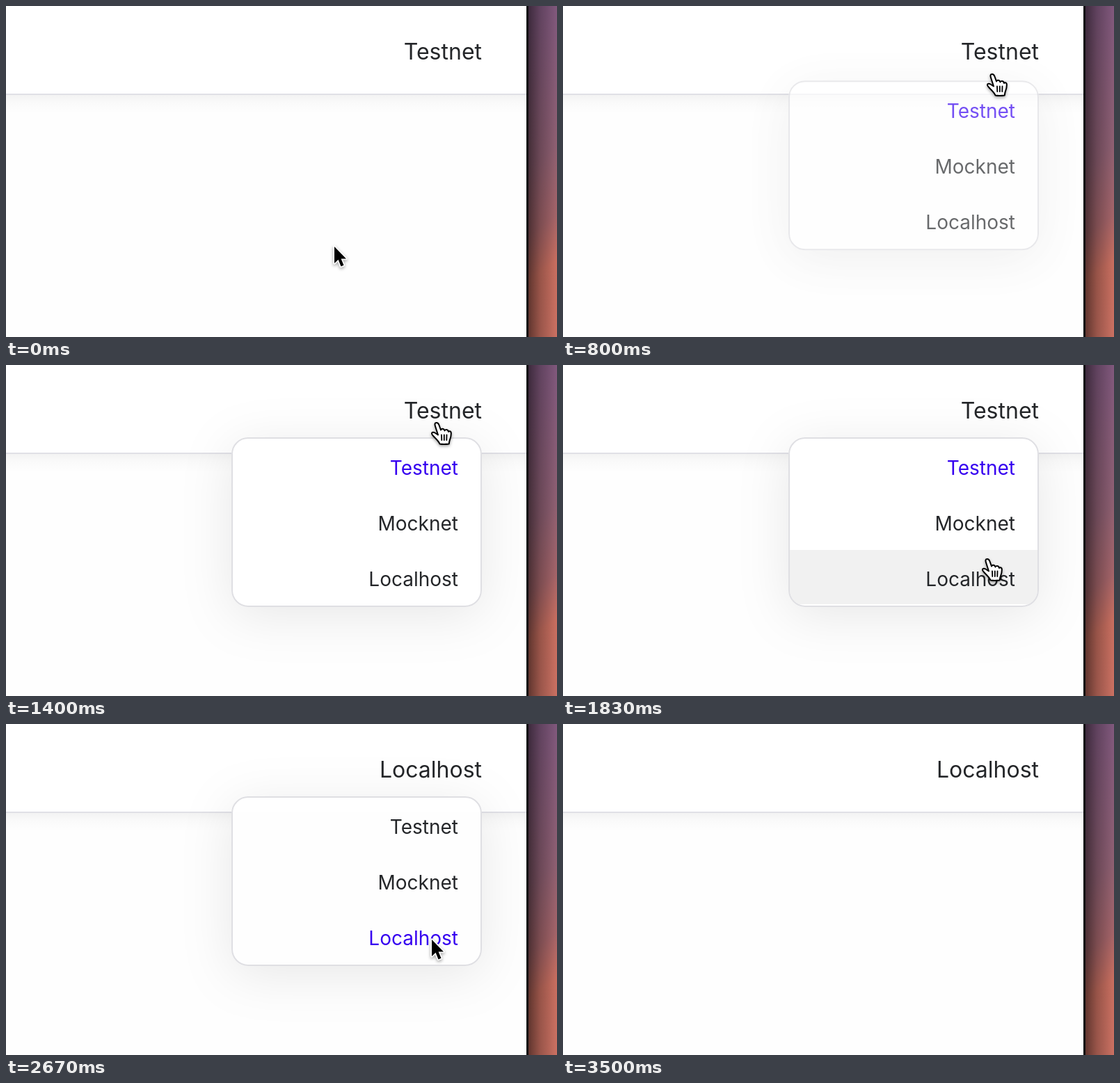
Recreate the animation shown at these times as an HTML page. Size 792 px wide and 476 px high, loop 4.41 s.

```html
<!DOCTYPE html>
<html lang="en">
<head>
<meta charset="utf-8">
<title>Network menu</title>
<style>
  html, body { margin: 0; width: 100%; height: 100%; overflow: hidden; background: #fff; }
  svg { display: block; width: 792px; height: 476px; }
  text { font-family: Inter, "Open Sans", sans-serif; font-optical-sizing: none; text-anchor: end; fill: #242629; }
  #title { font-size: 32px; }
  #menu text { font-size: 28px; }
  #panel { filter: drop-shadow(0 12px 36px rgba(0, 0, 0, .09)); }
  #cursor { filter: drop-shadow(0 2px 2px rgba(0, 0, 0, .35)); }
</style>
</head>
<body>
<svg viewBox="0 0 792 476">
  <defs>
    <linearGradient id="headerShade" x2="0" y2="1">
      <stop stop-opacity=".045"/>
      <stop offset=".4" stop-opacity=".018"/>
      <stop offset="1" stop-opacity="0"/>
    </linearGradient>
    <linearGradient id="sunset" gradientUnits="userSpaceOnUse" x1="772" y1="0" x2="1000" y2="305">
      <stop stop-color="#80587e"/>
      <stop offset=".45" stop-color="#8f6073"/>
      <stop offset=".66" stop-color="#a5656a"/>
      <stop offset=".8" stop-color="#c96f60"/>
      <stop offset="1" stop-color="#cb7162"/>
    </linearGradient>
    <linearGradient id="edgeShade">
      <stop stop-opacity=".52"/>
      <stop offset=".4" stop-opacity=".25"/>
      <stop offset="1" stop-opacity="0"/>
    </linearGradient>
  </defs>

  <rect width="792" height="476" fill="#fefefe"/>
  <rect width="748" height="126" fill="#fff"/>
  <rect y="128" width="748" height="26" fill="url(#headerShade)"/>
  <rect y="126" width="748" height="2" fill="#e0e0e6"/>
  <text id="title" x="684" y="76.5"></text>

  <g id="menu">
    <rect id="panel" x="324" y="104" width="360" height="244" rx="24" fill="#fff"/>
    <clipPath id="inside"><rect x="326" y="106" width="356" height="240" rx="22"/></clipPath>
    <g clip-path="url(#inside)"><rect id="hover" x="326" width="356" height="78" fill="#f1f1f1"/></g>
    <rect x="325" y="105" width="358" height="242" rx="23" fill="none" stroke="#dfdfe3" stroke-width="2"/>
    <text x="650" y="158">Testnet</text>
    <text x="650" y="238">Mocknet</text>
    <text x="650" y="318">Localhost</text>
  </g>

  <rect x="751" width="41" height="476" fill="url(#sunset)"/>
  <rect x="751" width="41" height="476" fill="url(#edgeShade)"/>
  <rect x="748" width="3" height="476" fill="#0c0d10"/>

  <g id="cursor">
    <path id="arrow" d="M1 2V26L6.6 20.8 10.5 30.5 14.5 28.8 10.6 19.5H18Z"
      stroke="#fff" stroke-width="3.4" stroke-linejoin="round" paint-order="stroke"/>
    <g id="hand" transform="translate(-8)" stroke="#000" stroke-width="2" stroke-linejoin="round" stroke-linecap="round">
      <path fill="#fff" d="M10 18.5L6 6C5 3 5.5 1 7.5 1 9.5 .8 10.8 2.5 11.5 4.5L14 11.5C14.2 10 16 9.5 17.5 10 19 10.5 19.3 12 19.5 12.5 20 11 22 10.8 23.2 11.3 24.5 11.8 24.8 13 25 14 25.5 13 28.7 12.5 28.8 16 29 21 27.5 24 26.5 27L25.7 31.5Q18 32.5 12.5 31.5C11.5 28.5 8 25 5 22 3 20 1 18 1 16.5 1 14.5 3.5 14.3 5.5 15.5Z"/>
      <path fill="none" stroke-width="1.8" d="M15 18.5L15.3 26M18.8 18.5V26M22.5 18.5L22.3 26"/>
    </g>
  </g>
</svg>
<script>
  const LOOP = 4410;
  const HOVER_AT = 570, OPEN_AT = 740, SELECT_AT = 2666, HIDE_AT = 3200;
  const NAMES = ['Testnet', 'Mocknet', 'Localhost'];

  // Pointer hot spot: time, x, y
  const PATH = [
    [0, 471, 344], [100, 486, 324], [230, 549, 217], [330, 601, 128], [430, 621, 95], [530, 621, 84],
    [630, 618, 86], [735, 618, 86], [800, 617, 97], [900, 617, 97],
    [1230, 619, 82], [1367, 619, 82], [1400, 619, 82], [1620, 616, 178], [1833, 610, 278],
    [1850, 610, 278], [2000, 613, 318], [2310, 613, 318], [2530, 611, 308],
    [2950, 611, 308], [3060, 605, 352], [3167, 597, 400]
  ];

  const el = id => document.getElementById(id);
  const show = (node, on) => node.setAttribute('visibility', on ? 'visible' : 'hidden');
  const clamp = v => Math.min(1, Math.max(0, v));
  const items = [...document.querySelectorAll('#menu text')];

  const slope = (i, axis) => {
    const a = PATH[i], b = PATH[i + 1];
    return a && b ? (b[axis] - a[axis]) / (b[0] - a[0]) : 0;
  };
  const tangent = (i, axis) => {
    const before = slope(i - 1, axis), after = slope(i, axis);
    return before * after <= 0 ? 0 : 2 * before * after / (before + after);
  };

  // Monotone cubic through the path points
  function pointer(t, axis) {
    const last = PATH.length - 1;
    if (t >= PATH[last][0]) return PATH[last][axis];
    const i = PATH.findIndex(p => p[0] > t) - 1;
    const [a, b] = [PATH[i], PATH[i + 1]];
    const span = b[0] - a[0], u = (t - a[0]) / span, v = 1 - u;
    return v * v * (1 + 2 * u) * a[axis] + u * u * (3 - 2 * u) * b[axis]
      + span * u * v * (v * tangent(i, axis) - u * tangent(i + 1, axis));
  }

  // CSS "ease": cubic-bezier(.25, .1, .25, 1)
  function ease(x) {
    if (x <= 0 || x >= 1) return clamp(x);
    let lo = 0, hi = 1;
    for (let k = 0; k < 20; k++) {
      const s = (lo + hi) / 2;
      const at = .75 * s * (1 - s) + s ** 3;
      if (at < x) lo = s; else hi = s;
    }
    return .3 * lo * (1 - lo) ** 2 + 3 * lo * lo * (1 - lo) + lo ** 3;
  }

  function recordedTime(ms) {
    const rest = ms % 100;
    return (Math.floor(ms / 100) * 3 + (rest >= 70 ? 2 : rest >= 30 ? 1 : 0)) * 100 / 3;
  }

  function draw(ms) {
    const t = recordedTime(ms);
    const x = pointer(t, 1), y = pointer(t, 2);
    const selected = t >= SELECT_AT ? 2 : 0;
    const isHand = t >= HOVER_AT - 5 && t < SELECT_AT;

    const opacity = selected ? 1 - ease((t - SELECT_AT) / 100) : ease((t - OPEN_AT) / 150);
    el('menu').setAttribute('opacity', t < 766 ? 0 : opacity);
    el('menu').setAttribute('transform', `translate(0 ${(10 * (1 - opacity)).toFixed(2)})`);

    const row = Math.floor((y - 106) / 80);
    show(el('hover'), isHand && t > OPEN_AT && row >= 0);
    el('hover').setAttribute('y', 106 + 80 * row);

    el('title').textContent = NAMES[selected];
    items.forEach((item, i) => item.style.fill = i === selected ? '#3600f0' : '');

    el('cursor').setAttribute('transform', `translate(${x.toFixed(2)} ${y.toFixed(2)})`);
    const visible = t < HIDE_AT;
    show(el('arrow'), visible && !isHand);
    show(el('hand'), visible && isHand);
  }

  const start = performance.now();
  function tick() {
    draw((performance.now() - start) % LOOP);
    requestAnimationFrame(tick);
  }
  tick();
</script>
</body>
</html>
```
